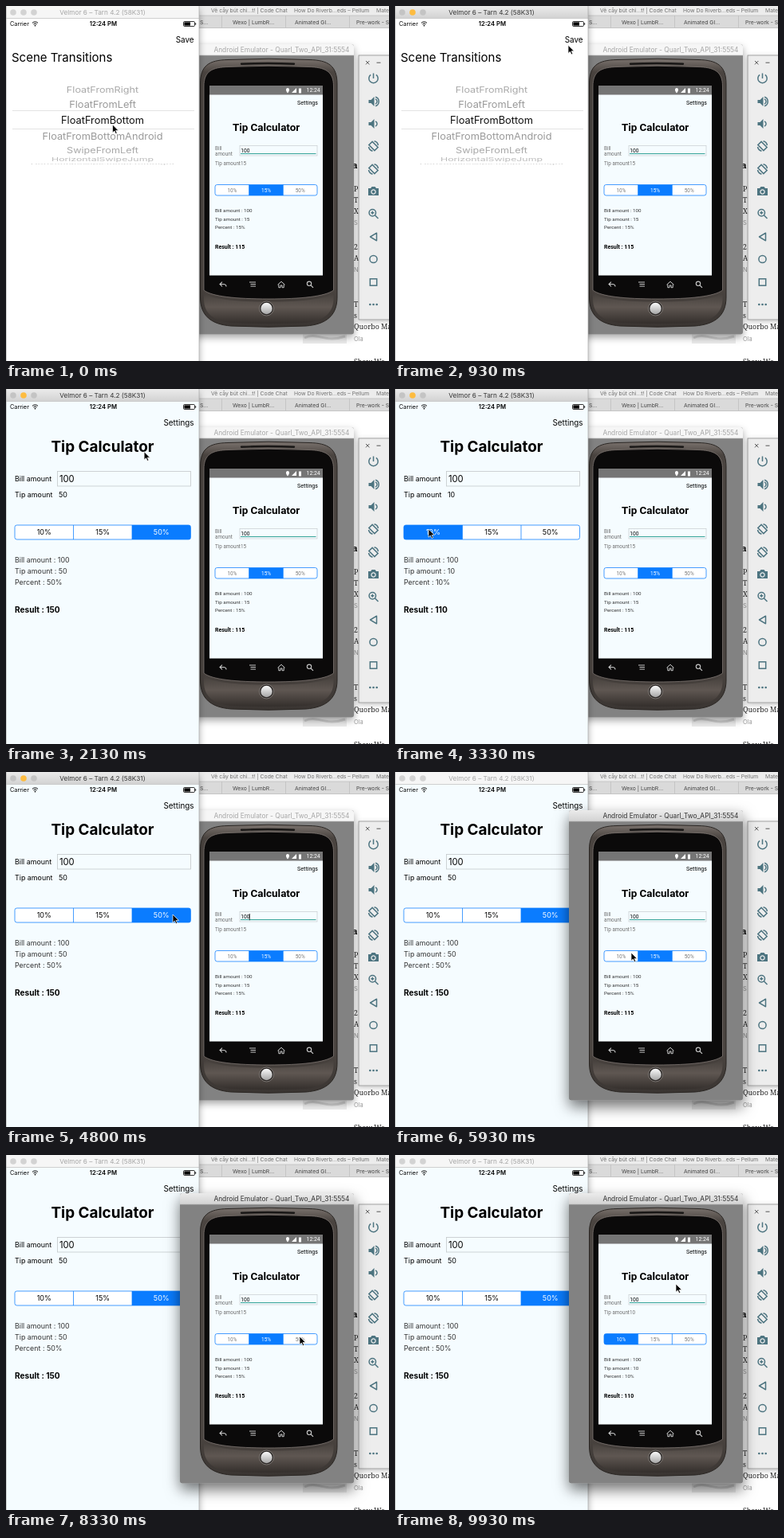
Write an HTML page that moves like this. It is 480x446 px and loops after 9.99 s.

```html
<!DOCTYPE html>
<html lang="en">
<head>
<meta charset="utf-8">
<title>Tip Calculator</title>
<style>
html, body { margin: 0; width: 100%; height: 100%; overflow: hidden; background: #fff; }
svg { display: block; width: 480px; height: 446px; }
text { white-space: pre; }
</style>
</head>
<body>
<svg id="stage" viewBox="0 0 480 446" xmlns="http://www.w3.org/2000/svg"></svg>
<script>
const LOOP = 9990, BLUE = '#0a7cff', PALE = '#f5fcff';
const INTER = 'Inter, sans-serif', ROBOTO = 'Roboto, sans-serif', SERIF = "'Noto Serif', serif";
const stage = document.getElementById('stage');

// Text placed by the middle of its capitals.
function text(x, y, size, str, o = {}) {
  const { fill = '#000', font = INTER, weight = 400, anchor = 'start', id = '' } = o;
  return `<text ${id && `id="${id}"`} x="${x}" y="${(y + size * .36).toFixed(2)}" font-size="${size}" font-family="${font}" font-weight="${weight}" text-anchor="${anchor}" fill="${fill}">${str}</text>`;
}
function rect(x, y, w, h, fill, extra = '') {
  return `<rect x="${x}" y="${y}" width="${w}" height="${h}" fill="${fill}" ${extra}/>`;
}
function line(d, stroke, width = 1, extra = '') {
  return `<path d="${d}" fill="none" stroke="${stroke}" stroke-width="${width}" ${extra}/>`;
}
function circle(x, y, r, fill, extra = '') {
  return `<circle cx="${x}" cy="${y}" r="${r}" fill="${fill}" ${extra}/>`;
}
function gradient(id, stops) {
  const parts = stops.map(([at, c]) => `<stop offset="${at}" stop-color="${c}"/>`).join('');
  return `<linearGradient id="${id}" x1="0" y1="0" x2="0" y2="1">${parts}</linearGradient>`;
}
function shadow(id, blur, dy, alpha) {
  return `<filter id="${id}" x="-30%" y="-30%" width="160%" height="160%"><feDropShadow dx="0" dy="${dy}" stdDeviation="${blur}" flood-opacity="${alpha}"/></filter>`;
}

// Three-way segmented control.
function segments(id, x, y, w, h, size, font) {
  const cell = w / 3;
  const cells = ['10%', '15%', '50%'].map((label, i) =>
    rect(x + i * cell, y, cell, h, '#fff', `id="${id}Cell${i}" clip-path="url(#${id}Clip)"`) +
    text(x + (i + .5) * cell, y + h / 2, size, label, { font, anchor: 'middle', id: `${id}Label${i}` })).join('');
  const rules = [1, 2].map(i => `M${x + i * cell} ${y}v${h}`).join('');
  return `<clipPath id="${id}Clip">${rect(x, y, w, h, '#000', 'rx="2.6"')}</clipPath>` + cells +
    rect(x, y, w, h, 'none', `rx="2.6" stroke="${BLUE}" stroke-opacity=".75"`) +
    line(rules, BLUE, 1, 'stroke-opacity=".75"');
}

function browser() {
  const tab = { fill: '#707070' }, ink = { font: SERIF, fill: '#222' }, dim = { fill: '#999' };
  const left = [['P', 230], ['T', 244], ['X', 258], ['2', 303], ['A', 317], ['T', 375], ['s', 389]];
  return rect(0, 0, 480, 446, '#fff') +
    rect(0, 0, 480, 12, '#ececec') + rect(0, 12, 480, 16, '#dadada') +
    line('M0 12H480M0 27.5H480M270.5 12V27M350.5 12V27M430.5 12V27', '#bfbfbf', .8) +
    text(235, 6, 6.8, 'k', tab) +
    text(257, 6, 6.8, 'Vẽ cây bút chì...t! | Code Chat', tab) +
    text(361, 6, 6.8, 'How Do Riverb...eds – Pellum', tab) +
    text(464, 6, 6.8, 'Mate', tab) +
    text(243, 20.4, 6.8, 'S...', { fill: '#444' }) +
    text(284, 20.4, 6.8, 'Wexo | LumbR...', { fill: '#444' }) +
    text(362, 20.4, 6.8, 'Animated GI...', { fill: '#444' }) +
    text(439, 20.4, 6.8, 'Pre-work - S', { fill: '#444' }) +
    text(434, 200, 11, 'a', { font: SERIF, weight: 700 }) +
    left.map(([s, y]) => text(436, y, 8.8, s, ink)).join('') +
    text(436, 272, 7.5, 'S', dim) + text(436, 331, 7.5, 'N', dim) +
    text(436, 403, 8.8, 'Quorbo Ma', ink) + text(436, 418, 7.5, 'Ola', dim) +
    text(436, 446.5, 8.8, 'Show We', ink) +
    rect(372, 408, 55, 16, '#ececec') + line('M374 417C390 409 400 424 425 415', '#cfcfcf', 3);
}

function toolbar() {
  const c = '#4d7480';
  const icon = (y, body, extra = '') => `<g transform="translate(460.5 ${y})" fill="none" stroke="${c}" stroke-width="1.5" ${extra}>${body}</g>`;
  const path = d => `<path d="${d}"/>`;
  const speaker = '<path d="M-6-2h3l4-4V6l-4-4h-3z" fill="' + c + '" stroke="none"/>';
  const turn = rect(-3, -5, 6, 10, 'none', 'transform="rotate(-45)"') + path('M-6 1A6.5 6.5 0 0 0-1 6.2M6-1A6.5 6.5 0 0 0 1-6.2');
  return rect(442, 62, 42, 332, '#ededed', 'stroke="#8f8f8f" stroke-width=".8" filter="url(#soft)"') +
    line('M451 69l4.4 4.4M455.4 69L451 73.4M464.5 71.2h5', '#555', 1) +
    icon(91, path('M0-6.5V0M-3.4-4.6A5.7 5.7 0 1 0 3.4-4.6')) +
    icon(120, speaker + path('M2.5-3A3.2 3.2 0 0 1 2.5 3M2.6-5.7A6 6 0 0 1 2.6 5.7')) +
    icon(148, speaker + path('M2.5-3A3.2 3.2 0 0 1 2.5 3')) +
    icon(176, turn) + icon(205, turn) +
    icon(233, `<path d="M-6.5-4h3l1.5-2h4l1.5 2h3v9h-13z" fill="${c}" stroke="none"/>` + circle(0, .5, 2.6, c, 'stroke="#ededed" stroke-width="1.2"')) +
    icon(261, circle(-1.2, -1.2, 4.2, 'none') + path('M2 2L6 6M-3.2-1.2h4M-1.2-3.2v4')) +
    icon(290, path('M4-4.8V4.8L-4 0z'), 'stroke-linejoin="round"') +
    icon(318, circle(0, 0, 4.6, 'none')) +
    icon(347, rect(-4.2, -4.2, 8.4, 8.4, 'none')) +
    icon(375, [-4.2, 0, 4.2].map(x => circle(x, 0, 1.3, c, 'stroke="none"')).join(''));
}

function calculator() {
  const dim = { fill: '#333' };
  return rect(0, 16, 242, 430, PALE) +
    text(121, 72.5, 18.9, 'Tip Calculator', { weight: 700, anchor: 'middle' }) +
    text(11, 113, 8.9, 'Bill amount') +
    rect(64.5, 103.5, 167, 18.5, PALE, 'stroke="#c4c8ca" stroke-width=".8"') +
    text(67, 113, 11.2, '100') +
    text(11, 133, 8.9, 'Tip amount') + text(66, 133, 8.9, '', { id: 'pTip' }) +
    segments('p', 11, 171, 220.5, 18, 9, INTER) +
    text(11, 214.3, 8.9, 'Bill amount : 100', dim) +
    text(11, 228.5, 8.9, '', { ...dim, id: 'pRow' }) +
    text(11, 242.5, 8.9, '', { ...dim, id: 'pPercent' }) +
    text(11, 277, 10.1, '', { weight: 700, id: 'pResult' });
}

// Rows turn away from the viewer as on a drum.
function picker() {
  const rows = [
    ['FloatFromRight', 105.5, .8, '#a8a8a8'], ['FloatFromLeft', 123.5, .95, '#999'],
    ['FloatFromBottom', 143.3, 1, '#111'], ['FloatFromBottomAndroid', 163.3, .95, '#999'],
    ['SwipeFromLeft', 181, .8, '#a8a8a8'], ['HorizontalSwipeJump', 193, .5, '#bbb'],
    ['HorizontalSwipeJumpFromRight', 198.7, .08, '#ccc']];
  return text(7, 64.3, 15, 'Scene Transitions') +
    rows.map(([s, y, k, fill]) => `<g transform="translate(121 ${y}) scale(${.92 + .08 * k} ${k})">${text(0, 0, 12.85, s, { fill, anchor: 'middle' })}</g>`).join('') +
    line('M8 131.5H236M8 154.5H236', '#dcdcdc', .8);
}

function simulator() {
  return rect(-4, 0, 246, 460, '#fff', 'filter="url(#mid)"') +
    `<g id="calc">${calculator()}</g><g id="picker">${picker()}</g>` +
    text(235.5, 42, 9.9, 'Settings', { anchor: 'end', id: 'settings' }) +
    text(235.5, 42, 9.9, 'Save', { anchor: 'end', id: 'save' }) +
    text(5, 22.5, 7.3, 'Carrier') +
    line('M33 21.3A5 5 0 0 1 40 21.3M34.5 22.9A3 3 0 0 1 38.5 22.9', '#000', 1) + circle(36.5, 24.6, .9, '#000') +
    text(122, 22.5, 7.7, '12:24 PM', { weight: 600, anchor: 'middle' }) +
    rect(222.5, 19.5, 14, 6, '#fff', 'rx="1.2" stroke="#000" stroke-width=".8"') +
    rect(223.4, 20.4, 7.6, 4.2, '#000') + rect(237.2, 21.5, 1, 2, '#000') +
    rect(0, 0, 242, 15.5, '#f6f6f6', 'id="pBar"') + line('M0 15.5H242', '#c4c4c4', .8) +
    [9, 22, 35].map((x, i) => circle(x, 8, 3.8, '#d3d3d3', `id="lamp${i}"`)).join('') +
    text(121, 8, 8.2, 'Velmor 6 – Tarn 4.2 (58K31)', { anchor: 'middle', id: 'pTitle' }) +
    line('M.3 0V446M242 0V446', '#a9a9a9', .7);
}

function emulator() {
  const r = { font: ROBOTO }, dim = { font: ROBOTO, fill: '#707070' }, ink = { font: ROBOTO, fill: '#333' };
  const keys = '#c8c8c8';
  const body = 'M243.5 98C243.5 75 254 68 278 67.5Q329 65 380 67.5C404 68 415 75 415 98V366C415 389 401 400 376 402Q329 404.5 282 402C257 400 243.5 389 243.5 366z';
  return rect(218, 48, 218, 364.5, '#828282', 'rx="3" id="eFrame"') +
    '<path d="M218 62V51a3 3 0 0 1 3-3H433a3 3 0 0 1 3 3V62z" id="eBar"/>' + line('M218 62H436', '#b5b5b5', .7) +
    text(430.5, 55.3, 8.4, 'Android Emulator - Quarl_Two_API_31:5554', { anchor: 'end', id: 'eTitle' }) +
    `<path d="${body}" fill="url(#metal)" stroke="#292522" stroke-width="1"/>` +
    '<path d="M248 101C248 82 258 77 279 76.5Q329 74 379 76.5C400 77 410.5 82 410.5 101V357C400 365 370 368 329 368S258 365 248 357z" fill="#0b0a0a" stroke="#8b837e" stroke-width=".7"/>' +
    line('M295 72.8Q328 71.3 361 72.8', '#191716', 2.4, 'stroke-linecap="round"') +
    '<path d="M248 361C260 369 290 371.5 329 371.5S398 369 410.5 361V368C410 387 397 396 375 398Q329 400 283 398C261 396 248 387 248 368z" fill="url(#chin)"/>' +
    circle(326.5, 380, 9, '#2c2826', 'stroke="#8a8480" stroke-width=".8"') + circle(326.5, 380, 7.2, 'url(#ball)') +
    line('M276 352.5q0-3-3.5-3h-4.5m3-2.8l-3 2.8l3 2.8', keys, 1.1) +
    line('M305 347h8M306.5 349.5h6.5M306.5 352h6.5', keys, 1) +
    line('M340.5 350.2l4.5-4l4.5 4M341.8 349.5v4.2h2.2v-2.7h2v2.7h2.2v-4.2', keys, 1) +
    circle(380, 348.8, 2.7, 'none', `stroke="${keys}" stroke-width="1.1"`) + line('M382 350.8l3 3', keys, 1.2) +
    rect(255, 100, 142, 238.5, PALE) + rect(255, 100, 142, 11.5, '#757575') +
    `<path d="M353 109.5c-3-3.4-2.3-6.5 0-6.5s3 3.1 0 6.5zM358 109h6v-6zM367 103.5h3v6h-3z" fill="#fff"/>` +
    text(393.7, 106, 6.9, '12:24', { font: ROBOTO, fill: '#fff', anchor: 'end' }) +
    text(391, 121, 7.1, 'Settings', { ...r, anchor: 'end' }) +
    text(326, 152.5, 13.4, 'Tip Calculator', { ...r, weight: 700, anchor: 'middle' }) +
    text(262, 178.7, 6.4, 'Bill', dim) + text(262, 185.3, 6.4, 'amount', dim) +
    rect(293, 175.5, 97, 12.5, PALE, 'stroke="#c8cdd0" stroke-width=".7"') +
    text(294.3, 182, 6.6, '100', r) + line('M294 185.6H388.5', '#2b9d93', 1) +
    line('M305.3 178V186.3', '#222', .9, 'id="caret"') +
    text(262, 198, 6.3, '', { ...dim, id: 'eTip' }) +
    segments('e', 262, 224.5, 128, 13.5, 6.4, ROBOTO) +
    text(262, 256.5, 6.25, 'Bill amount : 100', ink) +
    text(262, 267.5, 6.25, '', { ...ink, id: 'eRow' }) +
    text(262, 278, 6.25, '', { ...ink, id: 'ePercent' }) +
    text(262, 302.5, 6.95, '', { ...r, weight: 700, id: 'eResult' });
}

stage.innerHTML = '<defs>' +
  gradient('bar', [[0, '#ebebeb'], [1, '#d2d2d2']]) +
  gradient('metal', [[0, '#7a726d'], [.05, '#4a4440'], [.85, '#4a4440'], [1, '#3a3532']]) +
  gradient('chin', [[0, '#45403c'], [.45, '#5f5752'], [1, '#342f2c']]) +
  gradient('ball', [[0, '#fafafa'], [1, '#a5a5a5']]) +
  shadow('soft', 3, 2, .25) + shadow('mid', 5, 4, .35) + shadow('deep', 9, 8, .55) +
  '</defs>' + browser() + toolbar() +
  `<g id="emu">${emulator()}</g><g id="sim">${simulator()}</g>` +
  '<path id="cursor" d="M0 0V10.2L2.4 8L4 11.6L5.7 10.8L4.1 7.4H7.4z" fill="#000" stroke="#fff" stroke-width=".7"/>';

const el = {};
stage.querySelectorAll('[id]').forEach(n => el[n.id] = n);

const pointer = [
  [0, 133.5, 149], [350, 133.5, 149], [1050, 224, 41], [1800, 224, 41], [2750, 42, 176],
  [3550, 42, 176], [3950, 121, 179], [4200, 121, 179], [4580, 209, 179], [5000, 209, 179],
  [5650, 296, 227], [6950, 296, 227], [7400, 326, 228], [7800, 326, 228], [8200, 368, 228],
  [8600, 368, 228], [9080, 285, 228], [9400, 285, 228], [9860, 352, 162], [LOOP, 352, 162]];
const simPicks = [[0, 2], [2950, 0], [4050, 1], [4660, 2]];
const emuPicks = [[0, 1], [6400, 0], [7520, 1], [8450, 2], [9200, 0]];
const SIM_ON = 530, SAVE = 1289, EMU_ON = 5720;
const rates = [10, 15, 50];

const latest = (list, t) => list.filter(s => s[0] <= t).pop()[1];

function pointerAt(t) {
  const i = Math.max(1, pointer.findIndex(p => p[0] > t));
  const [a, x0, y0] = pointer[i - 1], [b, x1, y1] = pointer[i];
  const u = (t - a) / (b - a), k = u * u * (3 - 2 * u);
  return [x0 + (x1 - x0) * k, y0 + (y1 - y0) * k];
}

// Overdamped spring from 0 to 1.
function spring(ms) {
  if (ms <= 0) return 0;
  const s = ms / 1000, fast = 66.9, slow = 12.1;
  const p = 1 - (fast * Math.exp(-slow * s) - slow * Math.exp(-fast * s)) / (fast - slow);
  return p > .998 ? 1 : p;
}

function pick(id, index, idle) {
  const rate = rates[index];
  rates.forEach((_, i) => {
    el[id + 'Cell' + i].setAttribute('fill', i === index ? BLUE : '#fff');
    el[id + 'Label' + i].setAttribute('fill', i === index ? '#fff' : idle);
  });
  el[id + 'Tip'].textContent = id === 'e' ? 'Tip amount' + rate : rate;
  el[id + 'Row'].textContent = 'Tip amount : ' + rate;
  el[id + 'Percent'].textContent = `Percent : ${rate}%`;
  el[id + 'Result'].textContent = 'Result : ' + (100 + rate);
}

function focus(t) {
  const sim = t >= SIM_ON && t < EMU_ON, emu = t >= EMU_ON;
  const paint = (id, on) => {
    el[id + 'Bar'].setAttribute('fill', on ? 'url(#bar)' : '#f6f6f6');
    el[id + 'Title'].setAttribute('fill', on ? '#333' : '#a6a6a6');
  };
  paint('p', sim);
  paint('e', emu);
  el.lamp0.setAttribute('fill', sim ? '#c4c4c4' : '#d3d3d3');
  el.lamp1.setAttribute('fill', sim ? '#fdbc40' : '#d3d3d3');
  el.lamp2.setAttribute('fill', sim ? '#c4c4c4' : '#d3d3d3');
  el.eFrame.setAttribute('filter', `url(#${emu ? 'deep' : 'mid'})`);
  const top = emu ? el.emu : el.sim;
  if (el.cursor.previousSibling !== top) stage.insertBefore(top, el.cursor);
}

function draw(t) {
  const p = spring(t - SAVE), k = .95 + .05 * p;
  el.calc.setAttribute('transform', `translate(121 231) scale(${k}) translate(-121 -231)`);
  el.calc.setAttribute('opacity', t < SAVE ? 0 : .3 + .7 * p);
  el.picker.setAttribute('transform', `translate(0 ${430 * p})`);
  el.picker.setAttribute('opacity', p < 1 ? 1 : 0);
  el.settings.setAttribute('opacity', p);
  el.save.setAttribute('opacity', 1 - p);
  focus(t);
  pick('p', latest(simPicks, t), '#000');
  pick('e', latest(emuPicks, t), '#777');
  const beat = t % 1000;
  el.caret.setAttribute('opacity', beat >= 400 && beat < 900 ? 1 : 0);
  el.cursor.setAttribute('transform', `translate(${pointerAt(t)})`);
}

const start = performance.now();
function tick() {
  draw((performance.now() - start) % LOOP);
  requestAnimationFrame(tick);
}
tick();
</script>
</body>
</html>
```
